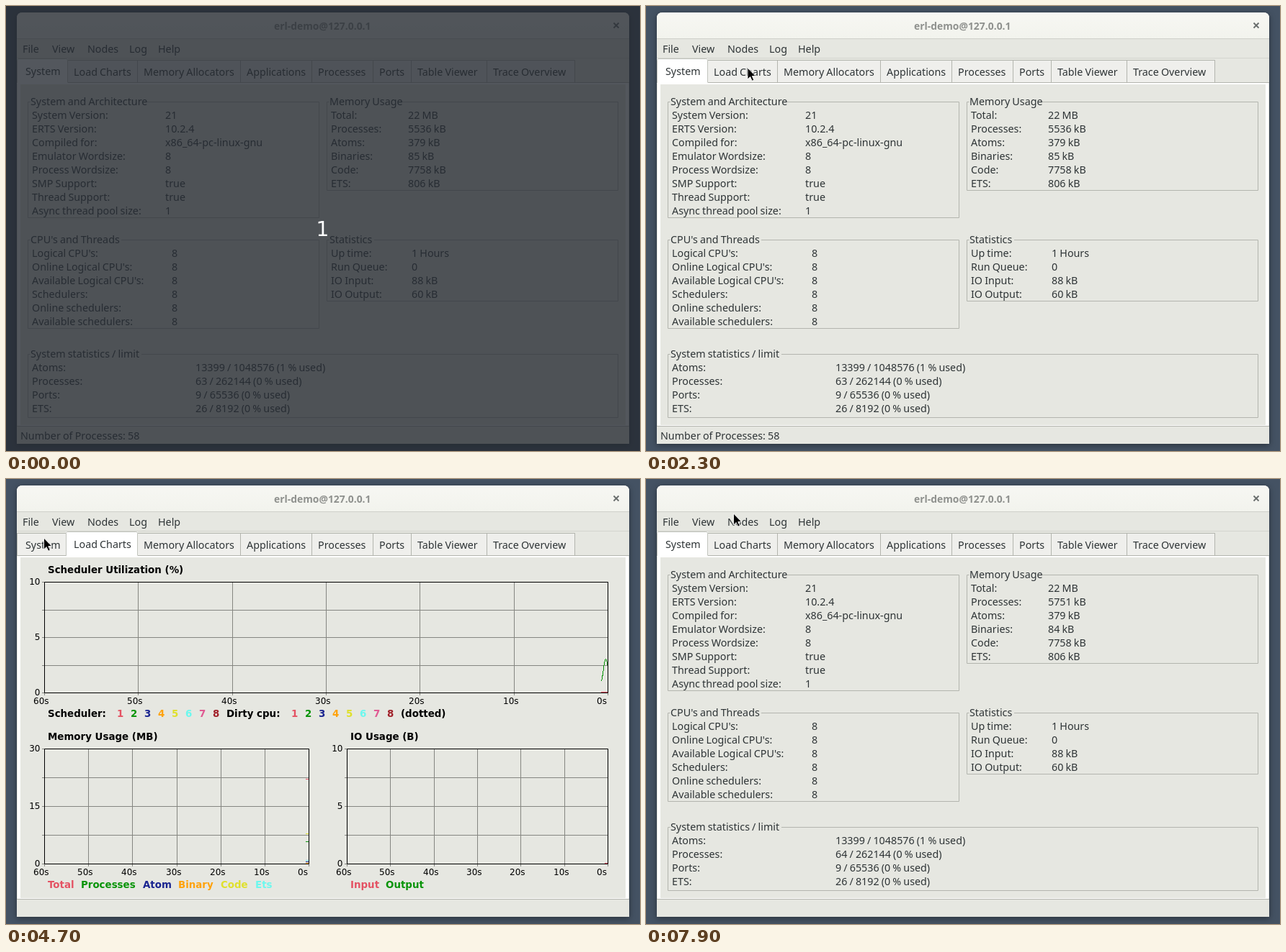
These frames come from a looping animation (880 by 619 pixels, 8 s). An HTML page:

```html
<!DOCTYPE html>
<html lang="en">
<head>
<meta charset="utf-8">
<title>System monitor</title>
<style>
html, body { margin: 0; width: 100%; height: 100%; overflow: hidden; background: #445263; }
svg { display: block; width: 100vw; height: 100vh; }
text { white-space: pre; }
.ui { font: 14.3px "Noto Sans", "Open Sans", sans-serif; word-spacing: -.6px; fill: #2e3436; }
.title { font: bold 13.9px "Noto Sans", "Open Sans", sans-serif; fill: #8f918e; }
.axis { font: 12px "DejaVu Sans", sans-serif; fill: #000; }
.head { font: bold 13.4px "DejaVu Sans", sans-serif; fill: #000; }
.count { font: 28px "DejaVu Sans", sans-serif; fill: #fff; text-anchor: middle; }
.end { text-anchor: end; }
</style>
</head>
<body>
<svg id="stage" viewBox="0 0 880 619" preserveAspectRatio="none">
  <defs>
    <linearGradient id="bar" x2="0" y2="1">
      <stop offset="0" stop-color="#f7f7f3"/><stop offset="1" stop-color="#f2f3ed"/>
    </linearGradient>
  </defs>
</svg>
<script>
const NS = 'http://www.w3.org/2000/svg';
const stage = document.getElementById('stage');
const FACE = '#e6e7e1', EDGE = '#b3b5ae', GRID = '#858681';
const COLORS = ['#e45263', '#089408', '#1a2590', '#ffa20a', '#dfe02c', '#6cf8ee', '#e05a92', '#a01f28'];

function add(parent, tag, attrs) {
  const el = document.createElementNS(NS, tag);
  for (const k in attrs) el.setAttribute(k, attrs[k]);
  return parent.appendChild(el);
}
const group = (parent = stage) => add(parent, 'g', {});
const rect = (g, x, y, width, height, fill, more) => add(g, 'rect', { x, y, width, height, fill, ...more });
const line = (g, d, stroke, more) => add(g, 'path', { d, stroke, fill: 'none', ...more });
function label(g, x, y, str, cls = 'ui', fill) {
  const el = add(g, 'text', { x, y, class: cls });
  if (fill) el.style.fill = fill;
  el.textContent = str;
  return el;
}
const show = (el, on) => el.setAttribute('display', on ? 'inline' : 'none');

// Window frame
rect(stage, 0, 0, 880, 619, '#445263');
add(stage, 'path', {
  d: 'M15 609V17Q15 9 23 9H857Q865 9 865 17V609Z', fill: FACE,
  style: 'filter:drop-shadow(0 2px 4px rgba(0,0,0,.4))'
});
add(stage, 'path', { d: 'M15 45V17Q15 9 23 9H857Q865 9 865 17V45Z', fill: 'url(#bar)' });
line(stage, 'M15 45.5H865', '#cfd0ca');
line(stage, 'M15 72.5H865', '#d3d4ce');
label(stage, 372, 33, 'erl-demo@127.0.0.1', 'title');
line(stage, 'M843.5 23.5l7 7m0 -7l-7 7', '#686c6b', { 'stroke-width': 1.8 });
[['File', 23], ['View', 64], ['Nodes', 113], ['Log', 171], ['Help', 211]]
  .forEach(([s, x]) => label(stage, x, 65, s));

// Notebook
rect(stage, 16, 107, 848, 477, '#fff');
rect(stage, 20, 109, 840, 474, FACE);
line(stage, 'M15 106.5H865M15 584.5H865', EDGE);
const TABS = [['System', 27, 15], ['Load Charts', 94, 83], ['Memory Allocators', 191, 182],
  ['Applications', 334, 325], ['Processes', 433, 424], ['Ports', 518, 509],
  ['Table Viewer', 571, 562], ['Trace Overview', 676, 667]];
const tabs = TABS.map(([s, x, left], i) => {
  const right = i < 7 ? TABS[i + 1][2] : 789;
  rect(stage, left + .5, 75.5, right - left, 31, '#efefec', { stroke: EDGE });
  return { s, x, left, right };
});
const activeTabs = tabs.slice(0, 2).map(({ left, right }, i) => {
  const g = group();
  const end = right + (i ? 0 : 2);
  rect(g, left, 73, end - left + 1, 35, '#fff');
  line(g, `M${left + .5} 107V75.5Q${left + .5} 73.5 ${left + 2.5} 73.5H${end - 1.5}Q${end + .5} 73.5 ${end + .5} 75.5V106.5`, '#c3c5be');
  return g;
});
const tabText = tabs.map(t => label(stage, t.x, 97, t.s));
const status = label(stage, 20, 603, 'Number of Processes: 58');

// System page
const system = group();
function panel(x, y, right, bottom, gapEnd, title, valueX, rows) {
  line(system, `M${x + 3} ${y}H${x}V${bottom}H${right}V${y}H${gapEnd}`, EDGE);
  label(system, x + 3.5, y + 4.5, title);
  return rows.map(([name, value], i) => {
    const base = y + 23.5 + 19 * i;
    label(system, x + 5.5, base, name);
    return label(system, valueX, base, value);
  });
}
panel(30.5, 133.5, 434.5, 294.5, 196, 'System and Architecture', 221, [
  ['System Version:', '21'], ['ERTS Version:', '10.2.4'], ['Compiled for:', 'x86_64-pc-linux-gnu'],
  ['Emulator Wordsize:', '8'], ['Process Wordsize:', '8'], ['SMP Support:', 'true'],
  ['Thread Support:', 'true'], ['Async thread pool size:', '1']]);
const memory = panel(445.5, 133.5, 849.5, 256.5, 549, 'Memory Usage', 558, [
  ['Total:', '22 MB'], ['Processes:', ''], ['Atoms:', '379 kB'],
  ['Binaries:', ''], ['Code:', '7758 kB'], ['ETS:', '806 kB']]);
panel(30.5, 325.5, 434.5, 448.5, 160, "CPU's and Threads", 230, [
  ["Logical CPU's:", '8'], ["Online Logical CPU's:", '8'], ["Available Logical CPU's:", '8'],
  ['Schedulers:', '8'], ['Online schedulers:', '8'], ['Available schedulers:', '8']]);
panel(445.5, 325.5, 849.5, 410.5, 511, 'Statistics', 563, [
  ['Up time:', '1 Hours'], ['Run Queue:', '0'], ['IO Input:', '88 kB'], ['IO Output:', '60 kB']]);
const limits = panel(30.5, 484.5, 849.5, 572.5, 188, 'System statistics / limit', 263, [
  ['Atoms:', '13399 / 1048576 (1 % used)'], ['Processes:', ''],
  ['Ports:', '9 / 65536 (0 % used)'], ['ETS:', '26 / 8192 (0 % used)']]);

// Charts page
const charts = group();
function chart(left, right, top, bottom, title) {
  const x = k => Math.round(left + (right - left) * k / 6) + .5;
  const y = k => Math.round(top + (bottom - top) * k / 4) + .5;
  const head = label(charts, left + 5, top - 12.5, title, 'head');
  let d = '';
  for (let k = 0; k <= 6; k++) {
    d += `M${x(k)} ${top}V${bottom + 4}`;
    label(charts, x(k) - 15.5, bottom + 16, (60 - 10 * k) + 's', 'axis');
  }
  for (let k = 0; k <= 4; k++) d += `M${left - 3} ${y(k)}H${right}`;
  line(charts, d, GRID);
  line(charts, `M${x(0)} ${y(0)}H${x(6)}V${y(4)}H${x(0)}Z`, '#000');
  const scale = ['10', '5', '0'].map((s, k) =>
    label(charts, left - 5.5, top + (bottom - top) * k / 2 + 4.3, s, 'axis end'));
  const clip = add(charts, 'clipPath', { id: 'clip' + left + top });
  rect(clip, left, top, right - left + 1, bottom - top + 1);
  const curves = add(charts, 'g', { 'clip-path': `url(#clip${left}${top})`, 'shape-rendering': 'crispEdges' });
  const wait = label(charts, left + 101, Math.round(top + (bottom - top) * .585) + 4.5, 'Waiting for data', 'axis');
  return { left, right, top, bottom, head, scale, curves, wait, paths: [] };
}
const sched = chart(53, 835, 143, 297, 'Scheduler Utilization (%)');
const mem = chart(53, 420, 375, 535, 'Memory Usage (B)');
const io = chart(473, 835, 375, 535, 'IO Usage (B)');
const all = [sched, mem, io];

const legend = (x, y, s, fill) => label(charts, x, y, s, 'head', fill);
legend(58, 331, 'Scheduler:');
legend(306, 331, 'Dirty cpu:');
legend(548, 331, '(dotted)');
COLORS.forEach((c, i) => [154, 396].forEach(x => legend(x + 19 * i, 331, i + 1, c)));
[['Total', 58], ['Processes', 104], ['Atom', 190], ['Binary', 239], ['Code', 298], ['Ets', 346]]
  .forEach(([s, x], i) => legend(x, 569, s, COLORS[i]));
[['Input', 478], ['Output', 527]].forEach(([s, x], i) => legend(x, 569, s, COLORS[i]));

// Load of the busy scheduler, one knot per half second, eased between knots
const LOAD = [1, 3, 1.3, 3.7, 1.2, 2];
function load(sec) {
  const i = Math.min(Math.floor(sec * 2), LOAD.length - 2);
  const u = (1 - Math.cos(Math.PI * (sec * 2 - i))) / 2;
  return LOAD[i] + (LOAD[i + 1] - LOAD[i]) * u;
}
const flat = v => () => v;
function series(c, max, fns) {
  c.max = max;
  fns.map((fn, i) => ({ fn, color: COLORS[i] })).reverse()
    .forEach(s => c.paths.push({ fn: s.fn, el: line(c.curves, '', s.color) }));
}
series(sched, 10, [flat(0), load]);
series(mem, 30, [22, 5.6, .379, .085, 7.76, .806].map(flat));
series(io, 10, [flat(0), flat(0)]);

function plot(c, age) {
  const speed = (c.right - c.left) / 60;
  for (const { fn, el } of c.paths) {
    let d = '';
    for (let s = 0; s <= age + .001; s += .05) {
      const x = c.right - (age - s) * speed;
      const y = c.bottom - .5 - fn(s) / c.max * (c.bottom - c.top);
      d += `${d ? 'L' : 'M'}${x.toFixed(2)} ${y.toFixed(2)}`;
    }
    el.setAttribute('d', d);
  }
}

// Pointer: time, x, y
const TRACK = [
  [1500, 362, 21], [1600, 322, 38], [1700, 258, 55], [1800, 180, 70], [1900, 112, 80],
  [2000, 84, 82], [2100, 112, 82], [2300, 141, 86],
  [3300, 136, 86], [3400, 122, 85], [3500, 101, 83], [3600, 80, 81], [3700, 63, 80], [3800, 56, 80],
  [4000, 52.5, 82], [6500, 100, 89], [6600, 182, 107], [6800, 295, 178],
  [7000, 296, 185], [7100, 288, 172], [7200, 262, 138], [7300, 230, 104], [7400, 235, 87],
  [7600, 193, 80], [7900, 121.5, 48]];
const pointer = add(stage, 'path', {
  d: 'M0 0V16L3.7 12.5L6.2 18.2L8.8 17L6.3 11.6H11.2Z',
  fill: '#000', stroke: '#fff', 'stroke-width': .9
});

const cover = group();
rect(cover, 0, 0, 880, 619, 'rgb(37,42,50)', { 'fill-opacity': .79 });
label(cover, 439.5, 320, '1', 'count');

function render(time) {
  const t = Math.floor(time / 100) * 100;
  const onCharts = t >= 2400 && t < 5900;
  const active = onCharts ? 1 : 0;
  show(cover, t < 200);
  show(system, !onCharts);
  show(charts, onCharts && t >= 2900);
  show(status, t < 2400);
  activeTabs.forEach((g, i) => show(g, i === active));
  tabText.forEach((el, i) => el.setAttribute('y', i === active ? 96 : 97));

  const fresh = t >= 6000;
  memory[1].textContent = fresh ? '5751 kB' : '5536 kB';
  memory[3].textContent = fresh ? '84 kB' : '85 kB';
  limits[1].textContent = (fresh ? 64 : 63) + ' / 262144 (0 % used)';

  const mega = t >= 3800;
  mem.head.textContent = `Memory Usage (${mega ? 'MB' : 'B'})`;
  mem.scale[0].textContent = mega ? '30' : '10';
  mem.scale[1].textContent = mega ? '15' : '5';
  all.forEach(c => {
    show(c.wait, t < 4000);
    plot(c, (t - 4000) / 1000);
  });

  const at = TRACK.filter(k => k[0] <= t).pop();
  show(pointer, at);
  if (at) pointer.setAttribute('transform', `translate(${at[1]} ${at[2]})`);
}

const start = performance.now();
function tick() {
  render((performance.now() - start) % 8000);
  requestAnimationFrame(tick);
}
tick();
</script>
</body>
</html>
```
